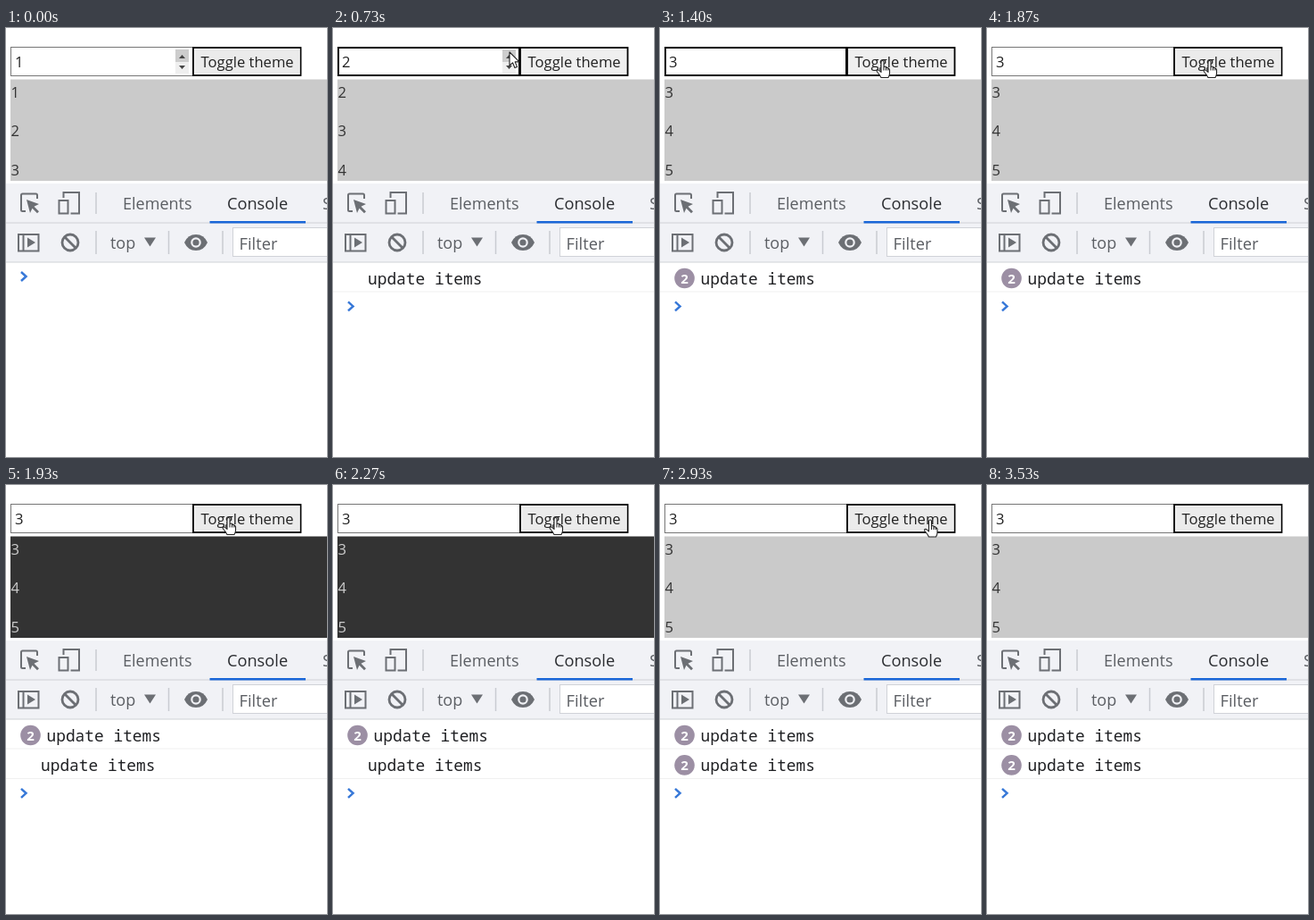
These frames come from a looping animation (360x480 px, 4140 ms). An HTML page:

```html
<!DOCTYPE html>
<html lang="en">
<head>
<meta charset="utf-8">
<title>Toggle theme</title>
<style>
  html, body { margin: 0; width: 100%; height: 100%; overflow: hidden; background: #fff; }
  svg { display: block; width: 360px; height: 480px; }
  text { font: 18px "Open Sans", "Noto Sans", sans-serif; fill: #5b5e63; white-space: pre; }
  .page { font-size: 16.6px; fill: #222; }
  .mono { font: 500 17.85px "Noto Sans Mono", "DejaVu Sans Mono", monospace; fill: #202124; }
  .count { font-size: 15px; font-weight: 700; fill: #fff; text-anchor: middle; }
  .icon { fill: none; stroke: #6c6f74; stroke-width: 2; }
  .solid { fill: #6c6f74; }
  .cursor { fill: #fff; stroke: #222; stroke-width: 1.1; stroke-linejoin: round; }
</style>
</head>
<body>
<svg viewBox="0 0 360 480">
  <rect id="input" fill="#fff"/>
  <text id="value" class="page" x="10" y="44"/>
  <path id="caret" d="M19 26V49" stroke="#000" stroke-width="1.6"/>
  <g id="spinner">
    <path d="M190 24h15v14h-15z" fill="#cdcdcd"/>
    <path d="M190 38h15v13h-15z" fill="#efefef"/>
    <path d="M194 34l3.5-4 3.5 4zM194 42l3.5 4 3.5-4z" fill="#444"/>
  </g>
  <rect x="210" y="22" width="120.500" height="31" fill="#efefef" stroke="#000" stroke-width="1.800"/>
  <rect id="ring" x="211.5" y="23.5" width="117.500" height="28" fill="#ebebeb" stroke="#f4f4f4"/>
  <text class="page" x="218.5" y="44">Toggle theme</text>

  <rect id="panel" x="5" y="57.5" width="355" height="113.5"/>
  <g id="items"></g>

  <path d="M0 174h360v88H0z" fill="#f1f2f6"/>
  <path d="M0 218h360M0 262h360" stroke="#cfd1d6"/>
  <path d="M228.500 217.300h107.500" stroke="#1a67d8" stroke-width="2.600"/>
  <path d="M101 184v24M101 227v26M182.5 227v26M243 227v26" stroke="#c9cbd1" stroke-width="1.5"/>
  <text x="131" y="203">Elements</text>
  <text x="248" y="203" style="fill:#2b2d31;font-size:18.2px">Console</text>
  <text x="355" y="203">Sources</text>
  <text x="117" y="247">top</text>
  <rect x="254.5" y="223.5" width="120" height="32" fill="#fff" stroke="#d0d2d8"/>
  <text x="261.5" y="248" style="font-size:18.3px">Filter</text>

  <g class="icon">
    <path d="M35 191v-4q0-1.500-1.500-1.500H18.500q-1.500 0-1.500 1.500v16.500q0 1.500 1.500 1.500H22"/>
    <path d="M64.500 190v-6H82v23.500h-9.500M59.500 193h10v14.500h-10z"/>
    <path d="M14 231h22.500v18.500H14zM19.500 231v18.500"/>
    <circle cx="72" cy="240" r="9" stroke-width="2.800"/>
    <path d="M65.500 233.500l13 13" stroke-width="2.800"/>
  </g>
  <g class="solid">
    <path d="M23 192l14 5-5.500 2.800 5.500 5.500-2 2-5.500-5.500-2.500 5.200z"/>
    <path d="M24 234.500l9 5.500-9 5.500z"/>
    <path d="M155 234.500h13l-6.500 10z"/>
    <path d="M200 240q4-9 13-9t13 9q-4 9-13 9t-13-9z"/>
  </g>
  <circle cx="213" cy="240" r="4.700" fill="#6c6f74" stroke="#f1f2f6" stroke-width="2.200"/>

  <g id="log"></g>
  <path id="prompt" d="M17 273l5.500 5-5.500 5" fill="none" stroke="#3778d8" stroke-width="2.500"/>

  <path id="arrow" class="cursor" d="M0 0v15l3.500-3.200 2.400 5.700 2.600-1.100-2.400-5.500h4.900z"/>
  <path id="hand" class="cursor" d="M-1.500 11V1.500q0-1.500 1.500-1.500t1.500 1.500V7q1-1 2.500 0v1q1.300-.800 2.300.300v1q1.700-.600 1.700 1.200v4q0 2-1.500 4.500h-8q-1-2.500-4.500-6.500-1-2 .800-2.200 1.400 0 3.700 2.700zM1.500 7v4M4 8v3M6.300 9.300V11"/>
</svg>
<script>
const $ = id => document.getElementById(id);
const STEP = 200 / 3, LOOP = 4140, ROW = 33.4;

const set = (id, attrs) => {
  for (const name in attrs) $(id).setAttribute(name, attrs[name]);
};
const show = (id, on) => set(id, { visibility: on ? "visible" : "hidden" });
const within = (n, from, to) => n >= from && n < to;

function logRow(count, i) {
  const y = i * ROW;
  const badge = count > 1
    ? `<circle cx="27.500" cy="${280 + y}" r="11.300" fill="#9c8fa4"/>
       <text class="count" x="27.500" y="${285.5 + y}">${count}</text>` : "";
  return `${badge}<text class="mono" x="${count > 1 ? 45.5 : 39}" y="${286.5 + y}">update items</text>
    <path d="M0 ${295 + y}h360" stroke="#f0f0f0"/>`;
}

function pointer(n) {
  if (n < 16) return [198, 27];
  if (n < 43) {
    const p = Math.min(1, (n - 16) / 5), ease = p * (2 - p);
    return [203 + 46.5 * ease, 28 + 8.5 * ease];
  }
  return n < 44 ? [276, 38] : [303, 39];
}

function draw(t) {
  const n = Math.floor((t + 4) / STEP);
  const value = n < 3 ? 1 : n < 13 ? 2 : 3;
  const dark = within(n, 29, 36);
  const focused = within(n, 1, 27);
  const counts = [value - 1];
  if (n >= 29) counts.push(dark ? 1 : 2);
  const rows = counts.filter(c => c > 0);

  set("input", focused
    ? { x: 6, y: 22, width: 203, height: 31, stroke: "#000", "stroke-width": 2 }
    : { x: 5.5, y: 21.5, width: 204, height: 32, stroke: "#767676", "stroke-width": 1 });
  $("value").textContent = value;
  show("caret", within(n, 3, 11) || within(n, 13, 21));
  show("ring", !focused);

  set("panel", { fill: dark ? "#333" : "#cacaca" });
  $("items").innerHTML = [0, 1, 2].map(i =>
    `<text class="page" x="5.500" y="${78 + i * 43.3}" style="fill:${dark ? "#ccc" : "#333"}">${value + i}</text>`).join("");

  $("log").innerHTML = rows.map(logRow).join("");
  set("prompt", { transform: `translate(0 ${rows.length * ROW})` });

  const [x, y] = pointer(n), visible = within(n, 1, 48), onButton = x > 209;
  show("spinner", !onButton);
  show("arrow", visible && !onButton);
  show("hand", visible && onButton);
  for (const id of ["arrow", "hand"]) set(id, { transform: `translate(${x} ${y})` });
}

const start = performance.now();
function tick() {
  draw((performance.now() - start) % LOOP);
  requestAnimationFrame(tick);
}
tick();
</script>
</body>
</html>
```
